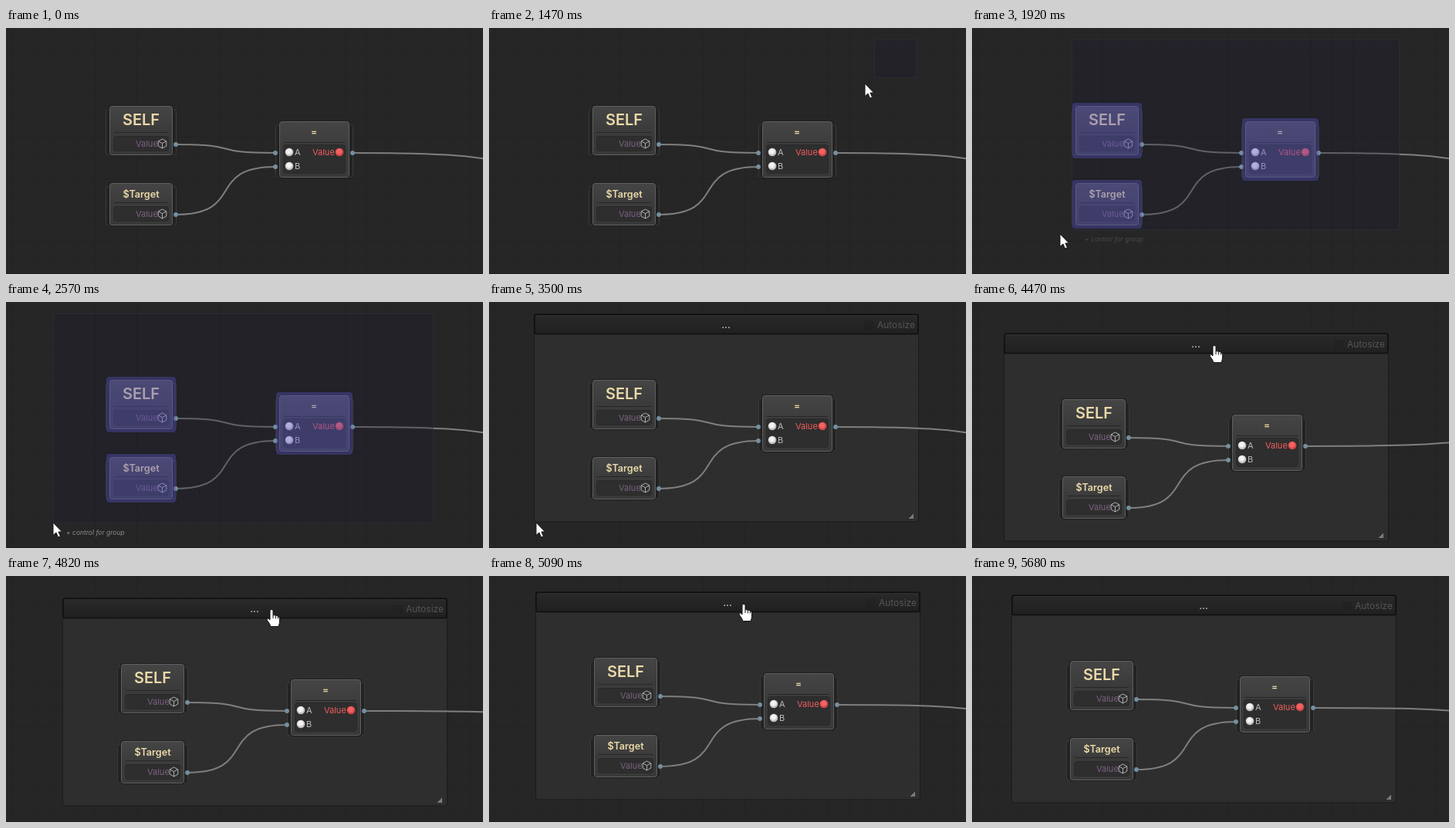
An HTML page for the animation above (6260 ms loop, 618x319 px).

```html
<!DOCTYPE html>
<html lang="en">
<head>
<meta charset="utf-8">
<title>Grouping graph nodes</title>
<style>
  html, body { margin: 0; width: 100%; height: 100%; overflow: hidden; background: #262626; }
  svg { display: block; width: 618px; height: 319px; }
  text { font-family: Inter, Roboto, sans-serif; font-size: 11px; }
  .title { font-weight: 600; fill: #ead9a8; text-anchor: middle; }
  .dim { fill: #7b6182; }
  .pin { fill: #bcbcbc; }
  .wire { fill: none; stroke: #7f7f7f; stroke-width: 2; }
  .pick { fill: #5350b8; fill-opacity: .42; }
  #hint { font-size: 8.5px; font-style: italic; }
  #hand, #arrow { fill: #fff; stroke: #151515; stroke-width: 1; stroke-linejoin: round; }
</style>
</head>
<body>
<svg viewBox="0 0 618 319">
  <defs>
    <pattern id="grid" x="7" y="6" width="27" height="27" patternUnits="userSpaceOnUse">
      <path d="M.5 0V27M0 .5H27" stroke="#232323" fill="none"/>
    </pattern>
    <linearGradient id="nodeFill" x2="0" y2="1">
      <stop stop-color="#454545"/><stop offset=".5" stop-color="#3b3b3b"/><stop offset="1" stop-color="#393939"/>
    </linearGradient>
    <linearGradient id="headFill" x2="0" y2="1">
      <stop stop-color="#292929"/><stop offset="1" stop-color="#202020"/>
    </linearGradient>
    <radialGradient id="white" cx=".45" cy=".4"><stop offset=".5" stop-color="#f4f4f4"/><stop offset="1" stop-color="#bdbdbd"/></radialGradient>
    <radialGradient id="red" cx=".45" cy=".4"><stop offset=".5" stop-color="#f56262"/><stop offset="1" stop-color="#cf4444"/></radialGradient>
  </defs>
  <rect width="618" height="319" fill="#262626"/>
  <rect width="618" height="319" fill="url(#grid)"/>
  <path d="M0 318.5H618" stroke="#1d1d1d"/>

  <g id="group" class="move">
    <rect x="58.5" y="15.5" width="498" height="269.5" rx="3" fill="#363636" fill-opacity=".5" stroke="#1b1b1b"/>
    <rect x="59" y="16.5" width="497" height="25" rx="2.5" fill="url(#headFill)" stroke="#0f0f0f" stroke-width="1.5"/>
    <path d="M61 17.8H554" stroke="#343434"/>
    <rect x="486" y="24" width="13" height="12" rx="2" fill="#1d1d1d" fill-opacity=".4"/>
    <text x="307" y="34" text-anchor="middle" font-weight="600" style="font-size:12px" fill="#c8c8c8">...</text>
    <text x="552" y="34" text-anchor="end" style="font-size:12px" fill="#555">Autosize</text>
    <path d="M550 274.5V281H543.5Z" fill="#7c7c7c"/>
  </g>

  <path id="out" class="wire"/>
  <g id="wires" class="move"></g>
  <rect id="marquee" y="15.5" fill="#1a1a2c" fill-opacity=".3" stroke="#34344a" stroke-opacity=".45"/>
  <g id="nodes" class="move"></g>
  <text id="hint">+ control for group</text>
  <path id="arrow" d="M0 0V16.5L4 13L6.5 19L9.5 17.8L7 12H11.5Z"/>
  <path id="hand" d="M-2 .5Q0-2 2 .5V7Q4 6 5.3 7.5Q7.2 6.5 8.3 8.5Q10.5 8.5 10.5 11V15Q10.5 18 9 21.5H-1Q-2 18-5.5 13.5Q-6.5 10-4 11L-2 13ZM2 7v4M5.3 7.5v4M8.3 8.5v3"/>
</svg>
<script>
const LOOP = 6260, LAG = 25;
const $ = id => document.getElementById(id);

const curve = (x1, y1, x2, y2) => {
  const c = (x2 - x1) * .7;
  return `M${x1} ${y1}C${x1 + c} ${y1} ${x2 - c} ${y2} ${x2} ${y2}`;
};
const ball = (x, y, fill) => `<circle cx="${x}" cy="${y}" r="5.3" fill="url(#${fill})"/>`;
const port = (x, y) => `<circle cx="${x}" cy="${y}" r="2.9" fill="#7390a2"/>`;
const cube = (x, y) => `<path d="M${x} ${y - 6}l5.3 2.8v6.2l-5.3 3l-5.3-3v-6.2zM${x - 5.3} ${y - 3.2}l5.3 2.8l5.3-2.8M${x} ${y - .4}v6.4"
  fill="none" stroke="#b4b4b4" stroke-width=".95"/>`;
const pick = (id, x, y, w, h) => `<rect id="${id}" class="pick" x="${x}" y="${y}" width="${w}" height="${h}" rx="4"/>`;

// Node frame: side rails, body, title rule and recessed row
function frame(x, y, w, h, rule, rowTop, rowH) {
  return `<rect x="${x - 4.5}" y="${y + 4.5}" width="${w + 9}" height="${h - 5}" rx="3" fill="#232323" stroke="#3a3a3a"/>
    <rect x="${x - 1}" y="${y - 1}" width="${w + 2}" height="${h + 2}" rx="4" fill="#1e1e1e"/>
    <rect x="${x + .5}" y="${y + .5}" width="${w - 1}" height="${h - 1}" rx="3" fill="url(#nodeFill)" stroke="#606060"/>
    <path d="M${x + 6} ${rule + .5}H${x + w - 6}" stroke="#262626"/>
    <rect x="${x + 5.5}" y="${rowTop + .5}" width="${w - 11}" height="${rowH - 1}" rx="3" fill="#2e2e2e" stroke="#292929"/>`;
}

function source(id, y, h, title, size, base) {
  const row = y + h - 25;
  return frame(134, y, 82, h, row - 5, row, 20) +
    `<text class="title" x="175" y="${base}" style="font-size:${size}px">${title}</text>
     <text class="dim" x="168" y="${row + 14}">Value</text>` +
    cube(202.5, row + 10) + port(220, row + 11) + pick(id, 130, y - 4, 90, h + 8);
}

$('wires').innerHTML = [curve(220, 151, 349, 162), curve(220, 242, 349, 180)]
  .map(d => `<path class="wire" d="${d}"/>`).join('');

$('nodes').innerHTML =
  source('pickSelf', 101, 64, 'SELF', 20, 126.4) +
  source('pickTarget', 201, 55, '$Target', 12.6, 219.5) +
  frame(354, 121, 91, 73, 148, 151, 38) +
  `<text class="title" x="399" y="139.4" style="font-size:12px">=</text>
   <text class="pin" x="374" y="165">A</text><text class="pin" x="374" y="183">B</text>
   <text x="397" y="165" fill="#ee5d5f">Value</text>` +
  ball(367, 161, 'white') + ball(367, 179, 'white') + ball(432, 161, 'red') +
  port(349, 162) + port(349, 180) + port(449, 162) +
  pick('pickEqual', 350, 117, 99, 81);

const part = (t, from, to) => Math.min(1, Math.max(0, (t - from) / (to - from)));
const mix = (a, b, p) => a + (b - a) * p;
const smooth = u => u * u * (3 - 2 * u);
// S-curve; a larger delay pushes the fast part later
const sweep = (u, delay) => u ** 2.33 / (u ** 2.33 + delay * (1 - u) ** 2.33);

// Eased value along a few turning points [ms, value]
const swing = (t, points) => points.slice(1).reduce(
  (v, [time, to], i) => mix(v, to, smooth(part(t, points[i][0], time))), points[0][1]);

const drag = t => [
  swing(t, [[4310, 0], [4470, -17], [4800, 15], [5310, -7]]),
  swing(t, [[4310, 0], [4470, 25], [5090, 5], [5310, 9]])
];

function pointer(t) {
  const enter = part(t, 130, 460), select = part(t, 930, 2160);
  const approach = smooth(part(t, 3640, 4290)), leave = smooth(part(t, 5530, 5670));
  const [dx, dy] = drag(t + LAG);
  let x = mix(562, 61, sweep(select, 3.25));
  let y = mix(mix(-20, 15, smooth(enter)), 286, sweep(select, 2.12));
  x = mix(x, 330, approach) + dx;
  y = mix(y, 32, approach) + dy;
  return [mix(x, 425, leave), mix(y, 4, leave)].map(Math.round);
}

const show = (id, on) => $(id).style.display = on ? '' : 'none';
const place = (el, x, y) => el.setAttribute('transform', `translate(${x} ${y})`);

function draw(t) {
  const grouped = t >= 3500;
  const [dx, dy] = drag(t).map(Math.round);
  document.querySelectorAll('.move').forEach(el => place(el, dx, dy));
  show('group', grouped);
  $('out').setAttribute('d', curve(449 + dx, 162 + dy, 797, 178));

  // The marquee trails the pointer slightly
  const [mx, my] = pointer(t - LAG);
  const selecting = t >= 960 && !grouped && mx < 553 && my > 15;
  show('marquee', selecting);
  if (selecting) {
    const box = { x: mx + .5, width: 553 - mx, height: my - 15 };
    for (const k in box) $('marquee').setAttribute(k, box[k]);
  }
  const hit = (right, top) => selecting && mx < right && my > top;
  const equal = hit(445, 121);
  show('pickEqual', equal);
  show('pickSelf', hit(216, 101));
  show('pickTarget', hit(216, 201));
  show('hint', equal);
  place($('hint'), mx + 17, my + 16);
  $('hint').setAttribute('fill', t < 2570 ? '#4a4a4a' : '#8a8a8a');

  const [x, y] = pointer(t);
  const visible = t >= 160 && t < 5680;
  const over = grouped && y >= 16 + dy && y < 42 + dy;
  show('arrow', visible && !over);
  show('hand', visible && over);
  place($('arrow'), x, y);
  place($('hand'), x, y);
}

const start = performance.now();
function tick() {
  draw((performance.now() - start) % LOOP);
  requestAnimationFrame(tick);
}
tick();
</script>
</body>
</html>
```
